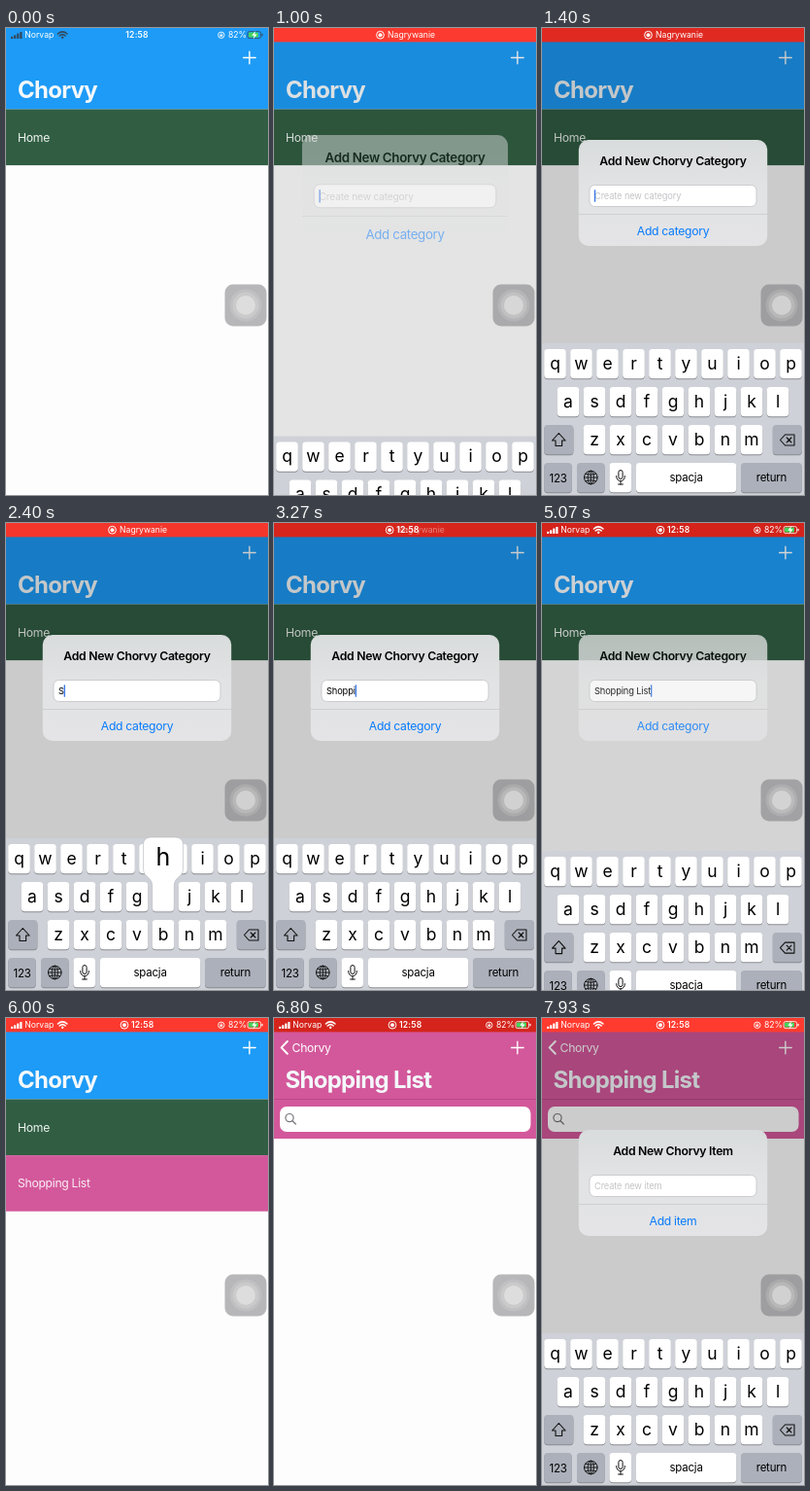
Recreate the animation shown at these times as an HTML page. Size 270 px wide and 480 px high, loop 8 s.

```html
<!DOCTYPE html>
<html lang="pl">
<head>
<meta charset="utf-8">
<title>Category list</title>
<style>
html, body { margin: 0; width: 100%; height: 100%; overflow: hidden; background: #fdfdfd; }
svg { display: block; width: 100vw; height: 100vh; }
text { font-family: Inter, "Open Sans", sans-serif; white-space: pre; }
.big { font-size: 24px; font-weight: 700; letter-spacing: -.03em; fill: #f4f8fb; }
.body { font-size: 12.2px; letter-spacing: -.025em; }
.head { font-size: 12.24px; font-weight: 600; letter-spacing: -.024em; }
.small { font-size: 9.3px; letter-spacing: -.015em; }
.bar { font-size: 8.64px; }
.clock { font-size: 8.64px; font-weight: 600; letter-spacing: .02em; }
.key { font-size: 17.5px; }
.word { font-size: 11.5px; letter-spacing: -.02em; }
.mid { text-anchor: middle; }
.line { fill: none; stroke-linecap: round; stroke-linejoin: round; }
</style>
</head>
<body>
<svg id="stage" viewBox="0 0 270 480" preserveAspectRatio="none"></svg>
<script>
const LOOP = 8000;
const APP = "Chorvy";
const BLUE = "#1d9bf6", GREEN = "#315e43", PINK = "#d3589b";

const stage = document.getElementById("stage");
const $ = id => document.getElementById(id);
const set = (id, attrs) => {
  for (const name in attrs) $(id).setAttribute(name, attrs[name]);
};
const show = (id, on) => set(id, { opacity: +on });

const clamp = v => Math.max(0, Math.min(1, v));
const span = (t, from, length) => clamp((t - from) / length);
const easeOut = p => 1 - (1 - p) ** 3;
const easeInOut = p => p * p * (3 - 2 * p);
const lerp = (a, b, p) => a + (b - a) * p;
const within = (t, a, b) => t >= a && t < b;

// Markup helpers
const rect = (x, y, w, h, fill, r = 0, extra = "") =>
  `<rect x="${x}" y="${y}" width="${w}" height="${h}" rx="${r}" fill="${fill}" ${extra}/>`;
const text = (x, y, cls, fill, str, extra = "") =>
  `<text x="${x}" y="${y}" class="${cls}" fill="${fill}" ${extra}>${str}</text>`;
const line = (d, stroke, width, extra = "") =>
  `<path class="line" d="${d}" stroke="${stroke}" stroke-width="${width}" ${extra}/>`;
const group = (id, inner, extra = "") => `<g id="${id}" ${extra}>${inner}</g>`;

// Keyboard layout
const KEY_W = 22.6, KEY_H = 30.2, PITCH = 27;
const ROWS = [["qwertyuiop", 2.2, 330], ["asdfghjkl", 15.7, 369], ["zxcvbnm", 42.7, 408]];
const keys = {};
for (const [letters, x0, y] of ROWS)
  [...letters].forEach((c, i) => { keys[c] = { x: x0 + i * PITCH, y }; });

const cap = (x, y, w, fill, id = "") =>
  rect(x, y + 1, w, KEY_H, "#898b90", 3.6) +
  rect(x, y, w, KEY_H, fill, 3.6, id && `id="${id}"`);

function keyboard() {
  const grey = "#abb0ba", y4 = 447;
  let out = rect(0, 324, 270, 156, "#ced1d7");
  for (const c in keys) {
    const { x, y } = keys[c];
    out += cap(x, y, KEY_W, "#fff") +
      text(x + KEY_W / 2, y + 20.5, "key mid letter", "#000", c);
  }
  out += cap(2.2, 408, 30.2, grey, "shift") + cap(237.8, 408, 30.2, grey);
  out += line("M17.3 416.5L10.5 424H14V429.5H20.6V424H24.1Z", "#111", 1.1, 'id="arrow"');
  out += line("M250.5 418H260V429H250.5L245.5 423.5ZM252.2 421L257 426M257 421L252.2 426", "#111", 1.1);
  out += cap(2.2, y4, 28.6, grey) + cap(36, y4, 28.6, grey) + cap(69.5, y4, KEY_W, "#fff");
  out += cap(97, y4, 103.3, "#fff", "space") + cap(205, y4, 62.8, grey);
  out += text(16.5, 466.5, "word mid", "#000", "123");
  out += text(148.6, 466.3, "word mid", "#000", "spacja");
  out += text(236.4, 466.3, "word mid", "#000", "return");
  out += '<circle cx="50.3" cy="462" r="6.8" fill="none" stroke="#111"/>' +
    '<ellipse cx="50.3" cy="462" rx="3.1" ry="6.8" fill="none" stroke="#111" stroke-width=".9"/>' +
    line("M43.5 462H57M50.3 455.2V468.8M45 458.3Q50.3 460.4 55.6 458.3M45 465.7Q50.3 463.6 55.6 465.7", "#111", .9);
  out += rect(78.9, 454.5, 4.2, 9, "none", 2.1, 'stroke="#111"') +
    line("M76.6 460.5C76.6 467.6 85.4 467.6 85.4 460.5M81 466V469M78.6 469H83.4", "#111", 1);
  return out + group("popup",
    '<path id="bubble" fill="#fff" stroke="#b3b6bc" stroke-width=".6"/>' +
    text(0, 0, "mid", "#000", "", 'id="popLetter" font-size="25"'));
}

function bubblePath({ x, y }) {
  const w = 41, c = x + KEY_W / 2;
  const l = Math.max(2, Math.min(268 - w, c - w / 2)), r = l + w;
  const x2 = x + KEY_W, top = y - 46, r8 = 8, low = y - 14, join = y + 4;
  return `M${l + r8} ${top}H${r - r8}Q${r} ${top} ${r} ${top + r8}V${low}` +
    `C${r} ${y - 4} ${x2} ${y - 6} ${x2} ${join}V${y + 27}Q${x2} ${y + KEY_H} ${x2 - 3} ${y + KEY_H}` +
    `H${x + 3}Q${x} ${y + KEY_H} ${x} ${y + 27}V${join}` +
    `C${x} ${y - 6} ${l} ${y - 4} ${l} ${low}V${top + r8}Q${l} ${top} ${l + r8} ${top}Z`;
}

const listPage = () =>
  rect(0, 0, 270, 480, "#fdfdfd") + rect(0, 0, 270, 83.5, BLUE) +
  rect(0, 83.5, 270, 57.6, GREEN) + text(12, 116.8, "body", "#eef3ef", "Home") +
  group("newRow", rect(0, 141.1, 270, 57.6, PINK, 0, 'id="rowFill"') +
    text(12, 174.4, "body", "#fbeef5", "Shopping List"));

const itemPage = () =>
  rect(0, 0, 270, 480, "#fdfdfd") + rect(0, 0, 270, 124, PINK) +
  rect(0, 83, 270, .8, "#b34882") + rect(6, 91, 258.5, 26, "#fff", 7) +
  '<circle cx="16" cy="102.6" r="4.1" fill="none" stroke="#77777c" stroke-width="1.2"/>' +
  line("M19 105.8L22.3 109", "#77777c", 1.3) +
  text(11.5, 72, "big", "#fff", "Shopping List");

const assist = () =>
  rect(225.5, 263.5, 43, 43, "rgba(115,115,118,.5)", 8.5) +
  [[16.5, .13], [13.5, .16], [10, .36]].map(([r, a]) =>
    `<circle cx="247" cy="285" r="${r}" fill="#fff" fill-opacity="${a}"/>`).join("");

const alertBox = () =>
  rect(37.8, 115, 194.4, 109, "url(#glass)", 10) +
  text(135, 141, "head mid", "#000", "", 'id="alertTitle"') +
  rect(49, 161.5, 172, 22, "#fff", 5.5, 'stroke="#c3c3c7" stroke-width=".8"') +
  text(54, 176, "small", "#c4c4c7", "", 'id="hint"') +
  text(54, 176, "small", "#000", "", 'id="typed"') +
  rect(53.8, 166.3, 1.4, 12.4, "#3b78e7", .5, 'id="caret"') +
  '<path id="pressed" d="M37.8 191.5H232.2V214Q232.2 224 222.2 224H47.8Q37.8 224 37.8 214Z" fill="#000" fill-opacity=".08"/>' +
  rect(37.8, 191, 194.4, .6, "#c3c4c8") +
  text(135, 212.8, "body mid", "#087bfc", "", 'id="action"');

const statusBar = () =>
  rect(0, 0, 270, 14.4, "#ff3b30", 0, 'id="statusFill"') +
  group("sides",
    group("signal",
      [0, 1, 2, 3].map(i => rect(5 + i * 3.1, 8.8 - i * 1.6, 2.2, 2.2 + i * 1.6, "currentColor", .5)).join("") +
      line("M53.4 6Q58.2 1.7 63 6M55.2 8Q58.2 5.3 61.2 8", "currentColor", 1.5) +
      '<circle cx="58.2" cy="9.8" r="1.2" fill="currentColor"/>' +
      rect(249, 3.6, 13.6, 7, "none", 2, 'stroke="currentColor" stroke-width=".8"') +
      rect(263.4, 5.8, 1.2, 2.6, "currentColor", .6)) +
    rect(250, 4.6, 10, 5, "#43d45c", 1.1) +
    '<path d="M257 3L253.3 7.7H255.8L254.8 11.4L258.7 6.5H256.2Z" fill="#fff"/>' +
    text(19.3, 10.4, "bar", "#fff", "Norvap") + text(229, 10.4, "bar", "#fff", "82%") +
    '<circle cx="221.8" cy="7.3" r="3.2" fill="none" stroke="#fff" stroke-width=".9"/>' +
    rect(220.4, 6.9, 2.8, 1.9, "#fff", .4) + line("M221 6.8V6Q221.8 5 222.6 6V6.8", "#fff", .6)) +
  text(135, 10.4, "clock mid", "#fff", "12:58", 'id="plainClock"') +
  group("record",
    '<circle r="3.9" cy="7.2" fill="none" stroke="#fff" stroke-width="1"/><circle r="2" cy="7.2" fill="#fff"/>' +
    text(7.6, 10.4, "bar", "#fff", "Nagrywanie", 'id="recLabel"') +
    text(7, 10.4, "clock", "#fff", "12:58", 'id="recClock"'));

stage.innerHTML =
  `<defs><linearGradient id="glass" x1="0" y1="0" x2="0" y2="1">
    <stop offset="0" stop-color="#d9dcdc"/><stop offset=".45" stop-color="#e2e3e4"/>
    <stop offset="1" stop-color="#e4e4e6"/></linearGradient></defs>` +
  group("list", listPage()) + group("items", itemPage()) +
  text(0, 0, "big", "#fff", APP, 'id="appTitle"') +
  group("back", line("M13.8 24L7.6 30.4L13.8 36.8", "#fff", 2) + text(18.6, 34.7, "body", "#fff", APP, 'id="backLabel"')) +
  line("M244.6 30.5H257.2M250.9 24.2V36.8", "#fff", 1.4, 'id="plus"') +
  rect(0, 0, 270, 480, "#000", 0, 'id="dim"') + group("assist", assist()) +
  group("alert", alertBox()) + group("keyboard", keyboard()) + group("status", statusBar());

const letters = [...document.querySelectorAll(".letter")];

// Taps on the keyboard: character and time
const TAPS = [["S", 2250], ["h", 2450], ["o", 2650], ["p", 2830], ["p", 2990], ["i", 3150],
  ["n", 3350], ["g", 3490], [" ", 3630], ["L", 3920], ["i", 4080], ["s", 4230], ["t", 4385]];

const ALERTS = [
  { start: 940, end: 5000, press: 4860, title: `Add New ${APP} Category`, hint: "Create new category", action: "Add category" },
  { start: 7180, end: 9999, press: 9999, title: `Add New ${APP} Item`, hint: "Create new item", action: "Add item" }
];

function drawStatus(t) {
  const on = easeInOut(span(t, 300, 250));
  const swap = easeOut(span(t, 3130, 360));
  const dark = (1 - Math.cos(2 * Math.PI * (t - 4400) / 1750)) / 2;
  const color = [[255, 204], [59, 32], [48, 24]].map(([a, b]) => Math.round(lerp(a, b, dark)));
  set("statusFill", { fill: `rgb(${color})`, opacity: on });
  show("plainClock", 1 - on);
  set("record", { opacity: on, transform: `translate(${lerp(109.5, 122, swap)} 0)` });
  show("recLabel", 1 - span(t, 3180, 160));
  show("recClock", span(t, 3130, 120));
  set("sides", { opacity: t < 2000 ? 1 - on : span(t, 3350, 200) });
  set("signal", { color: t < 2000 ? "#34495c" : "#fff" });
}

function drawPages(t) {
  const p = easeOut(span(t, 6230, 430));
  set("list", { transform: `translate(${-81 * p} 0)` });
  set("items", { transform: `translate(${270 * (1 - p)} 0)` });
  show("newRow", t >= 5270);
  set("rowFill", { fill: t >= 6140 ? "#d1d1d6" : PINK });
  set("appTitle", {
    transform: `translate(${lerp(12, 18.6, p)} ${lerp(72, 34.7, p)}) scale(${lerp(1, .51, p)})`,
    opacity: 1 - clamp(p * 1.4)
  });
  show("back", clamp(p * 2 - 1));
  set("backLabel", { x: lerp(50, 18.6, p) });
  show("plus", within(t, 800, 930) || within(t, 7040, 7170) ? .35 : 1);
}

function drawAlert(t) {
  const a = ALERTS[t < 6500 ? 0 : 1];
  const enter = easeOut(span(t, a.start, 300));
  const leave = easeInOut(span(t, a.end, 250));
  const alpha = enter * (1 - leave);
  const up = easeOut(span(t, a.start, 400)) * (1 - easeInOut(span(t, a.end, 400)));
  const size = lerp(1.18, 1, enter);
  set("dim", { opacity: .2 * alpha });
  set("alert", { opacity: alpha, transform: `translate(135 169.5) scale(${size}) translate(-135 -169.5)` });
  set("keyboard", { transform: `translate(0 ${157 * (1 - up)})` });
  $("alertTitle").textContent = a.title;
  $("action").textContent = a.action;
  show("pressed", within(t, a.press, a.end + 60));

  const typed = t < 6500 ? TAPS.filter(tap => t >= tap[1]).map(tap => tap[0]).join("") : "";
  $("typed").textContent = typed;
  $("hint").textContent = typed ? "" : a.hint;
  const width = typed ? $("typed").getComputedTextLength() : 0;
  set("caret", { x: 53.8 + width });
  show("caret", within(t, 1950, 4700) || (t - a.start) % 1000 < 650);
}

function drawKeys(t) {
  const upper = within(t, 1950, 2300) || within(t, 3770, 3970);
  for (const el of letters) {
    const c = el.textContent;
    el.textContent = upper ? c.toUpperCase() : c.toLowerCase();
  }
  set("shift", { fill: upper ? "#fff" : "#abb0ba" });
  $("arrow").style.fill = upper ? "#111" : "none";

  const tap = TAPS.find(([, at]) => within(t, at - 50, at + 50));
  const key = tap && keys[tap[0].toLowerCase()];
  set("space", { fill: tap && !key ? "#abb0ba" : "#fff" });
  show("popup", !!key);
  if (key) {
    set("bubble", { d: bubblePath(key) });
    const x = Math.max(22.5, Math.min(247.5, key.x + KEY_W / 2));
    set("popLetter", { x, y: key.y - 17 });
    $("popLetter").textContent = tap[0];
  }
}

function frame() {
  const t = performance.now() % LOOP;
  drawPages(t);
  drawAlert(t);
  drawKeys(t);
  drawStatus(t);
  requestAnimationFrame(frame);
}
frame();
</script>
</body>
</html>
```
